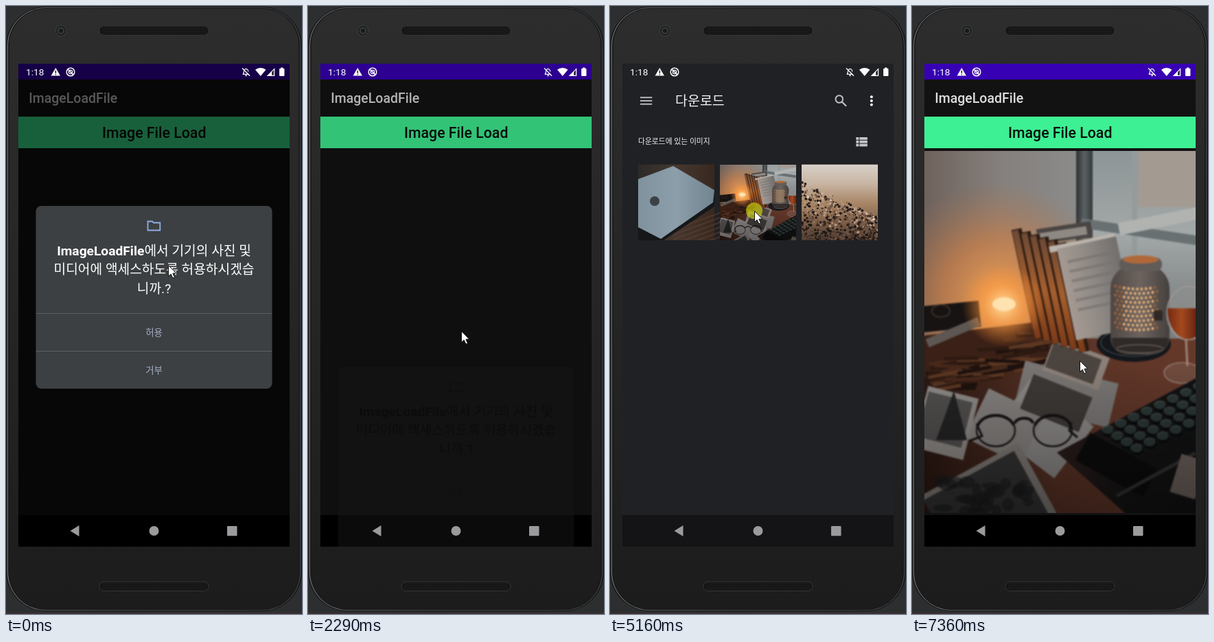
Write an HTML page with a canvas that moves like this. It is 431x885 px and loops after 8470 ms.

```html
<!DOCTYPE html>
<html lang="ko">
<head>
<meta charset="utf-8">
<title>Image file load</title>
<style>
html, body { margin: 0; width: 100%; height: 100%; overflow: hidden; background: #2d2e30; }
canvas { display: block; }
</style>
</head>
<body>
<canvas id="stage" width="431" height="885"></canvas>
<script>
const stage = document.getElementById('stage').getContext('2d');
let g = stage;
const LOOP = 8470;
const FONT = 'Roboto, "Noto Sans CJK KR", "Noto Sans CJK", sans-serif';
const SCREEN = [18, 84, 395, 703];
const START = [236, 377], ALLOW = [223, 473], BUTTON = [208, 166], THUMB = [210, 298], PICTURE = [212, 515], END = [244, 516];

// Bursts of change; a pointer move has start, bend and end
const BURSTS = [
  { from: 70, to: 880, steps: 14, move: [START, [232, 430], ALLOW] },
  { from: 1970, to: 2370, steps: 6 },
  { from: 2970, to: 3490, steps: 9, move: [ALLOW, [178, 320], BUTTON] },
  { from: 3810, to: 4560, steps: 12, move: [BUTTON, [209, 210], THUMB] },
  { from: 5480, to: 5960, steps: 8, move: [THUMB, [228, 368], PICTURE] },
  { from: 6680, to: 7360, steps: 11, move: [PICTURE, [360, 342], END] }
];
const CLICKS = [
  { from: 1970, to: 2090, at: ALLOW },
  { from: 3490, to: 3630, at: BUTTON },
  { from: 5160, to: 5280, at: THUMB },
  { from: 6220, to: 6280, at: PICTURE }
];

const ramp = (t, a, b) => Math.max(0, Math.min(1, (t - a) / (b - a)));
const smooth = u => u * u * (3 - 2 * u);
const easeOut = p => 1 - (1 - p) ** 3;
const random = seed => () => (seed = seed * 16807 % 2147483647) / 2147483647;

function rect(color, x, y, w, h) { g.fillStyle = color; g.fillRect(x, y, w, h); }
function round(color, x, y, w, h, r) {
  g.beginPath(); g.roundRect(x, y, w, h, r); g.fillStyle = color; g.fill();
}
function trace(p) {
  g.beginPath();
  for (let i = 0; i < p.length; i += 2) g.lineTo(p[i], p[i + 1]);
}
function poly(color, ...p) { trace(p); g.closePath(); g.fillStyle = color; g.fill(); }
function line(color, width, ...p) { trace(p); g.strokeStyle = color; g.lineWidth = width; g.stroke(); }
function oval(color, x, y, rx, ry = rx) {
  g.beginPath(); g.ellipse(x, y, rx, ry, 0, 0, 7); g.fillStyle = color; g.fill();
}
function ring(color, width, x, y, rx, ry = rx, a = 0, b = 7) {
  g.beginPath(); g.ellipse(x, y, rx, ry, 0, a, b);
  g.strokeStyle = color; g.lineWidth = width; g.stroke();
}
function text(str, x, y, size, color, weight = 400, align = 'left') {
  g.font = `${weight} ${size}px ${FONT}`;
  g.textAlign = align;
  g.fillStyle = color;
  g.fillText(str, x, y);
}
function fill(gradient, stops) {
  stops.forEach((c, i) => gradient.addColorStop(i / (stops.length - 1), c));
  return gradient;
}
const across = (x0, x1, ...stops) => fill(g.createLinearGradient(x0, 0, x1, 0), stops);
const down = (y0, y1, ...stops) => fill(g.createLinearGradient(0, y0, 0, y1), stops);
function glow(x, y, r, ...stops) {
  oval(fill(g.createRadialGradient(x, y, 0, x, y, r), stops), x, y, r);
}
function scoped(fn) { g.save(); fn(); g.restore(); }
function clip(x, y, w, h) { g.beginPath(); g.rect(x, y, w, h); g.clip(); }
function tile(color, x, y, w, h, turn = 0) {
  scoped(() => { g.translate(x, y); g.rotate(turn); rect(color, -w / 2, -h / 2, w, h); });
}
function zoom(s, fn) {
  scoped(() => {
    g.translate(215.5, 435.5); g.scale(s, s); g.translate(-215.5, -435.5);
    fn();
  });
}

function speaker(y) {
  round('#141414', 136, y, 159, 13.5, 6.5);
  g.strokeStyle = '#363636'; g.lineWidth = 1; g.stroke();
  for (let r = 0; r < 4; r++)
    for (let x = 140 + r % 2 * 1.5; x < 292; x += 3) rect('#2a2a2a', x, y + 2 + r * 2.8, 1.3, 1.3);
}

function phone() {
  rect('#2d2e30', 0, 0, 431, 885);
  rect('#3a3032', 0, 883, 431, 2);
  const shells = ['#151515', across(0, 431, '#626669', '#45484a', '#3c3f40'), '#161616', down(0, 885, '#2d2d2d', '#252525', '#1c1c1c')];
  shells.forEach((c, i) => round(c, i * 1.6, 1 + i, 431 - i * 3.2, 880 - i * 2, 58 - i * 1.5));
  ['#343434', '#202020', '#353c3c', '#171a1b'].forEach((c, i) => oval(c, 80, 36, 9 - i * 2));
  speaker(29);
  speaker(838);
}

function statusIcons() {
  const w = '#fff';
  text('1:18', 29, 101, 13.7, w);
  poly(w, 72.3, 90, 79, 101.5, 65.6, 101.5);
  rect('#222', 71.6, 94, 1.5, 4);
  rect('#222', 71.6, 99, 1.5, 1.3);
  ring(w, 1.5, 94, 96, 5.8);
  ring(w, 1.2, 94, 96, 2.7);
  line(w, 1.7, 90.5, 92.5, 98, 100);
  ring(w, 1.3, 349.6, 95.5, 3.1, 3.8, Math.PI, 0);
  line(w, 1.3, 346.5, 95.5, 345.4, 99.4, 353.5, 99.4);
  line(w, 1.3, 344, 90.5, 355, 101.7);
  oval(w, 349.6, 101.3, 1.3, 1);
  g.beginPath(); g.moveTo(370.7, 102); g.arc(370.7, 102, 12, -2.27, -.87); g.fillStyle = w; g.fill();
  poly(w, 379.6, 102, 391.2, 102, 391.2, 90.2);
  poly('#303038', 387, 100.8, 390, 100.8, 390, 93, 387, 96);
  round(w, 398, 91, 7.4, 11, 1);
  rect(w, 400, 89.6, 3.4, 2);
}

function navIcons() {
  const c = '#9b9a9c';
  poly(c, 93.5, 764, 106.5, 756, 106.5, 772);
  oval(c, 215.5, 764, 7);
  round(c, 322, 757, 14.5, 14.3, 1);
}

// Softened still life in flat shapes
function room() {
  rect(across(18, 240, '#6f625c', '#85807d', '#8b8b8a'), 18, 211, 222, 300);
  rect(down(211, 450, '#8d9596', '#a3a8a8', '#7b7f7f'), 240, 211, 173, 300);
  rect('#a39a92', 329, 211, 84, 82);
  rect(across(239, 263, '#2c3032', '#5c6164', '#33383a'), 239, 211, 24, 150);
  rect('#959b9b', 320, 211, 8, 170);
  tile('#687072', 340, 330, 190, 14, .15);
  tile('#b1b3b0', 365, 312, 130, 18, -.2);
  glow(125, 425, 170, '#f7a552ee', '#d9803f99', '#b0704400');
}

function books() {
  tile('#4a4543', 222, 330, 80, 22, -.15);
  tile('#8f8983', 205, 334, 100, 12, -.15);
  for (let i = 0; i < 6; i++) {
    tile('#2b1a12', 169 + i * 13, 404 + i * 4, 15, 162, -.21);
    tile(down(-80, 80, '#6d4a36', '#a55e2c', '#7b3a18'), 167 + i * 13, 405 + i * 4, 9, 160, -.21);
  }
  tile('#bab4ac', 248, 345, 98, 9, -.2);
  tile(across(-46, 46, '#a79b93', '#8d8884', '#716d6b'), 268, 411, 88, 136, -.21);
  for (let i = 0; i < 6; i++) tile('#777270aa', 257 + i * 3, 366 + i * 14, 62, 4, -.21);
}

function desk() {
  rect(across(18, 413, '#2b1813', '#5a3326', '#65392a'), 18, 484, 395, 254);
  tile('#3a2016', 100, 500, 240, 60, -.12);
  // camera and scarf
  tile('#171313', 57, 452, 84, 38, -.1);
  tile('#5d5652', 60, 475, 82, 13, -.4);
  ring('#3b2e28', 2, 42, 444, 13, 9);
  const rnd = random(41);
  for (let i = 0; i < 70; i++) {
    const x = 45 + rnd() * 140;
    tile(['#1e110d', '#47281a', '#5c3722', '#2c1911'][i % 4], x, 530 - x * .3 + rnd() * 50, 50, 5, -.25 + rnd() * .3);
  }
  oval('#13161a', 323, 492, 54, 26);
  ring('#3a4044', 1.5, 323, 490, 48, 20);
  // papers and prints
  tile('#787573', 225, 565, 140, 66, .24);
  tile('#8b8886', 190, 615, 115, 95, .65);
  tile('#84807e', 135, 612, 90, 80, .45);
  tile('#8b8079', 239, 521, 86, 50, .35);
  tile('#4c443f', 235, 520, 74, 38, .35);
  tile('#3d3937', 210, 578, 92, 54, .38);
  tile('#8e8985', 49, 607, 76, 92, .25);
  tile('#514f4e', 48, 602, 66, 68, .25);
  poly('#232324', 35, 632, 61, 560, 80, 632);
  tile('#7e7976', 115, 730, 160, 128, -.5);
  tile('#343333', 112, 737, 150, 122, -.5);
  for (let i = 0; i < 30; i++) oval('#1b1b1c99', 40 + rnd() * 130, 690 + rnd() * 48, 6 + rnd() * 8, 5 + rnd() * 5);
}

function lantern() {
  round(across(289, 375, '#4d4643', '#6d645f', '#45403e'), 289, 377, 86, 130, [34, 34, 24, 24]);
  round('#625c59', 302, 366, 62, 20, 9);
  oval('#b0683a', 333, 369, 26, 6);
  for (let r = 0; r < 10; r++)
    for (let u = -33 + r % 2 * 3.2; u < 30; u += 6.4)
      oval(Math.abs(u) < 23 ? '#eab17a' : '#9e6038', 329 + u, 408 + r * 6.6 + 4 * (1 - u * u / 1000), 1.9, 2.2);
  round('#302824', 352, 443, 13, 15, 3);
  round('#2f2a28', 291, 483, 82, 23, [2, 2, 20, 20]);
  ring('#81766e', 1, 332, 499, 34, 6);
}

function glass() {
  oval('#80665a66', 394, 534, 27, 15);
  ring('#9f8d83', 1.2, 394, 534, 27, 15);
  line('#a08475', 3, 399, 485, 401, 524);
  oval('#8f9190aa', 402, 447, 31, 39);
  ring('#aaa19b', 1.2, 402, 447, 31, 39);
  g.beginPath(); g.ellipse(402, 440, 30, 45, 0, 0, Math.PI);
  g.fillStyle = across(372, 413, '#74290f', '#a5491f', '#692510'); g.fill();
}

function spectacles() {
  const c = '#141112';
  for (const x of [122, 205]) {
    ring(c, 2.3, x, 618, 28, 23);
    ring(c, 4, x, 618, 28, 22, 3.5, 5.9);
  }
  ring(c, 4, 163, 610, 14, 10, 3.4, 6);
  line(c, 3, 94, 608, 102, 626, 84, 633);
  line(c, 3, 232, 606, 229, 618, 241, 628);
}

function typewriter() {
  poly(across(211, 413, '#2b1d1a', '#151415', '#111213'), 211, 650, 413, 542, 413, 738, 310, 738);
  tile('#0c0c0d', 298, 668, 112, 46, .5);
  for (let r = 0; r < 4; r++)
    for (let i = 0; i < 8; i++) {
      const x = 285 + i * 19 + r * 14, y = 617 - i * 9 + r * 9;
      oval('#090a0b', x + 1, y + 3, 9, 7);
      oval('#2b3635', x, y, 8.5, 6);
      ring('#687371', .8, x, y - 1, 8, 5, 3, 6);
    }
  tile('#343132', 355, 682, 130, 5, -.5);
  tile('#6b605a', 402, 685, 38, 58, .3);
}

const PHOTO = [18, 211, 395, 527];
function paintPhoto() {
  const sharp = new OffscreenCanvas(395, 527), soft = new OffscreenCanvas(395, 527);
  g = sharp.getContext('2d');
  g.translate(-18, -211);
  room(); desk(); books();
  glow(133, 436, 60, '#ffe0a0', '#ff9d4599', '#ff8a3000');
  oval('#ffe2b0', 134, 434, 17, 10);
  lantern(); glass(); spectacles(); typewriter();
  rect(down(520, 738, '#0000', '#0006'), ...PHOTO);
  g = soft.getContext('2d');
  g.drawImage(sharp, 0, 0);
  g.filter = 'blur(1px)';
  g.drawImage(sharp, 0, 0);
  g = stage;
  return soft;
}
const photo = paintPhoto();

function app(withPhoto) {
  rect('#121212', ...SCREEN);
  rect('#3700b3', 18, 84, 395, 23);
  text('ImageLoadFile', 33.2, 141.3, 19.5, '#dedede', 500);
  rect('#3df093', 18, 161, 395, 46);
  text('Image File Load', 215.7, 192, 21.3, '#080c0a', 500, 'center');
  if (withPhoto) g.drawImage(photo, ...PHOTO);
  rect('#000', 18, 741, 395, 46);
}

function dialog(ghost) {
  const ink = ghost ? '#080808' : '#fff', soft = ghost ? '#0c0c0c' : '#a5afc2';
  round(ghost ? '#141414' : '#3c4043', 43.5, 291, 344, 266, 8);
  line(ghost ? soft : '#8fb0e4', 1.8, 206.5, 313.5, 213, 313.5, 215, 315.5, 224.3, 315.5, 224.3, 326.5, 206.5, 326.5, 206.5, 312.6);
  const name = 'ImageLoadFile', rest = '에서 기기의 사진 및';
  g.font = `700 19.2px ${FONT}`;
  const w = g.measureText(name).width;
  g.font = `400 19.2px ${FONT}`;
  const x = 215.5 - (w + g.measureText(rest).width) / 2;
  text(name, x, 363, 19.2, ink, 700);
  text(rest, x + w, 363, 19.2, ink);
  text('미디어에 액세스하도록 허용하시겠습', 215.5, 390, 19.2, ink, 400, 'center');
  text('니까.?', 215.5, 418, 19.2, ink, 400, 'center');
  ['허용', '거부'].forEach((label, i) => {
    rect(ghost ? '#111' : '#5b5f63', 43.5, 447 + i * 55, 344, 1);
    text(label, 215.5, 480 + i * 55, 13.4, soft, 400, 'center');
  });
}

function laptopThumb() {
  rect(across(41, 152, '#2d2a28', '#453830', '#38281f'), 41, 230.5, 111, 111);
  for (let i = 0; i < 6; i++) tile('#62402b88', 130, 312 + i * 7, 80, 2, -.35);
  poly('#161719', 41, 254, 92, 234, 152, 270, 152, 292, 78, 341, 41, 341);
  poly(across(41, 152, '#7f929e', '#8b9eaa', '#71848f'), 41, 252, 92, 233, 152, 268, 150, 286, 74, 339, 41, 322);
  oval('#3b4146', 65, 284, 7);
}

function meadowThumb() {
  rect(down(231, 341, '#d8d0c8', '#c8b5a3', '#a98768', '#80614a', '#4a382e'), 279, 230.5, 111, 111);
  const rnd = random(97), tones = ['#1f1917', '#33261f', '#6f5342', '#b4957c', '#dcc3ae'];
  for (let i = 0; i < 750; i++) {
    const u = rnd(), height = 85 - 50 * u, d = rnd();
    oval(tones[Math.floor(rnd() * 5 * (.5 + d / 2))], 279 + u * 111, 341 - d * height, .5 + rnd() * 1.7);
  }
}

function picker(loaded) {
  rect('#202124', ...SCREEN);
  rect('#141416', 18, 741, 395, 46);
  for (let i = -1; i < 2; i++) {
    rect('#b4b6b9', 44, 137 + i * 4.8, 17.3, 2);
    oval('#fff', 380.8, 138 + i * 5.8, 2);
  }
  text('다운로드', 95, 145, 19.5, '#f1f2f4');
  ring('#bdc0c4', 2, 333.8, 135.5, 5.3);
  line('#bdc0c4', 2.3, 337.5, 139.3, 344, 145.7);
  if (!loaded) return;
  text('다운로드에 있는 이미지', 41, 201, 10.8, '#f1f2f4');
  for (let i = 0; i < 3; i++) {
    rect('#c3c5c8', 358.3, 191 + i * 4.8, 4, 3.8);
    rect('#c3c5c8', 363.3, 191 + i * 4.8, 11.5, 3.8);
  }
  scoped(() => { clip(41, 230.5, 349, 110.5); laptopThumb(); meadowThumb(); });
  g.drawImage(photo, 0, 66, 395, 395, 160, 230.5, 111, 110.5);
}

function asking(t) {
  app(false);
  const dim = .6 * (1 - ramp(t, 2190, 2336)), p = ramp(t, 2130, 2290);
  if (!dim) return;
  rect(`rgba(0,0,0,${dim})`, ...SCREEN);
  g.globalAlpha = 1 - p * .45;
  g.translate(0, 234 * p * p);
  dialog(p === 1);
}

function opening(t) {
  const p = ramp(t, 3790, 4100);
  zoom(1 + .1 * (1 - (1 - p) ** 1.5), () => app(false));
  g.globalAlpha = ramp(t, 3830, 3950);
  zoom(.9 + .1 * easeOut(p), () => picker(t > 4180));
}

function closing(t) {
  const p = ramp(t, 5480, 5780);
  zoom(1.1 - .1 * easeOut(p), () => app(true));
  g.globalAlpha = 1 - ramp(t, 5450, 5590);
  if (g.globalAlpha) zoom(1 - .1 * p, () => picker(true));
}

function bend([a, b, c], u) {
  const v = 1 - u;
  return a.map((x, i) => v * v * x + 2 * u * v * b[i] + u * u * c[i]);
}

// Holds the time between steps and places the pointer on its curve
function pose(t) {
  let at = START, held = 0;
  for (const { from, to, steps, move } of BURSTS) {
    if (t < from) break;
    const gap = (to - from) / (steps - 1);
    const k = Math.min(steps - 1, Math.floor((t - from) / gap + 1e-6));
    held = from + k * gap;
    if (move) at = bend(move, smooth((k + 1) / steps));
  }
  return { at, held };
}

function pointer([x, y]) {
  scoped(() => {
    g.translate(x + .5, y + .5);
    g.lineJoin = 'round';
    poly('#fff', 0, 0, 0, 16, 3.7, 12.7, 6.4, 18.5, 9, 17.4, 6.4, 11.7, 11.2, 11.4);
    g.strokeStyle = '#111'; g.lineWidth = 1; g.stroke();
  });
}

function draw(now) {
  const t = now % LOOP, { at, held } = pose(t);
  const scene = held < 3800 ? asking : held < 5480 ? opening : closing;
  phone();
  scoped(() => { clip(...SCREEN); scene(held); });
  statusIcons();
  navIcons();
  for (const c of CLICKS)
    if (t >= c.from && t < c.to) oval('rgba(202,202,10,.7)', ...c.at, 12);
  pointer(at);
}

let start;
function tick(now) {
  start ??= now;
  draw(now - start);
  requestAnimationFrame(tick);
}
draw(0);
requestAnimationFrame(tick);
</script>
</body>
</html>
```
